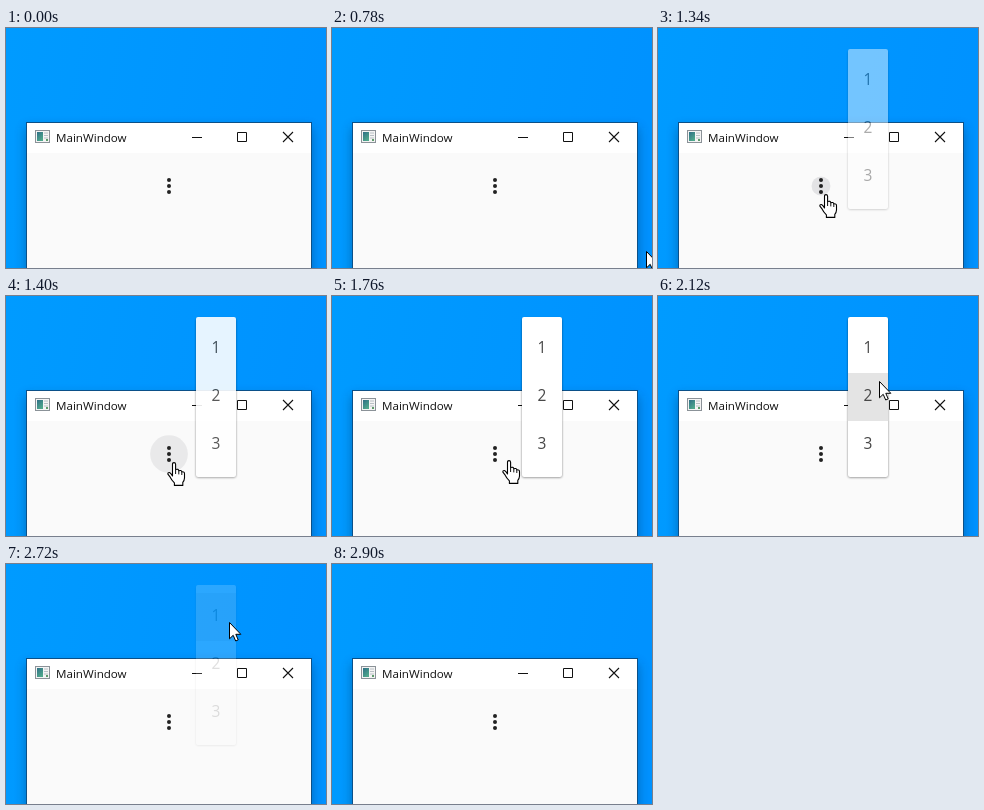
An HTML page that plays this animation: 320x240 px, repeating every 3100 ms.

```html
<!DOCTYPE html>
<html lang="en">
<head>
<meta charset="utf-8">
<title>Popup menu</title>
<style>
  html, body { margin: 0; width: 100%; height: 100%; overflow: hidden; background: #0097fd; }
  svg { display: block; width: 100vw; height: 100vh; }
  text { font-family: "Open Sans", "Noto Sans", sans-serif; }
  .title { font-size: 11.6px; fill: #111; }
  .item { font-size: 15.5px; fill: #484848; text-anchor: middle; }
  .glyph { fill: none; stroke: #111; }
  .cursor { fill: #fff; stroke: #000; stroke-linejoin: round; }
</style>
</head>
<body>
<svg viewBox="0 0 320 240">
  <defs>
    <linearGradient id="sky" x2="1" y2="0.15">
      <stop offset="0" stop-color="#009bff"/>
      <stop offset="1" stop-color="#0092ff"/>
    </linearGradient>
    <linearGradient id="teal" x2="0.6" y2="1">
      <stop offset="0" stop-color="#2f6f86"/>
      <stop offset="1" stop-color="#4fa88c"/>
    </linearGradient>
    <filter id="blur" x="-20%" y="-20%" width="140%" height="140%"><feGaussianBlur stdDeviation="6"/></filter>
    <filter id="soft" x="-20%" y="-10%" width="140%" height="120%"><feGaussianBlur stdDeviation="1.2"/></filter>
  </defs>

  <rect width="320" height="240" fill="url(#sky)"/>

  <rect x="20" y="100" width="286" height="170" fill="#002a55" opacity=".4" filter="url(#blur)"/>
  <rect x="20" y="94" width="286" height="160" fill="#0b5088"/>
  <rect x="21" y="95" width="284" height="150" fill="#fff"/>
  <rect x="21" y="125" width="284" height="120" fill="#fafafa"/>

  <g>
    <rect x="29.5" y="102.5" width="14" height="12" fill="#f4f4f4" stroke="#8b9298"/>
    <rect x="31" y="104" width="6" height="9" fill="url(#teal)"/>
    <path d="M38 105h4M38 107.5h4M38 110h4" stroke="#b9c0c5"/>
    <rect x="40" y="111" width="2" height="2" fill="#5d9b6a"/>
  </g>
  <text class="title" x="50" y="114">MainWindow</text>
  <path class="glyph" d="M186 109.5h10M231.5 104.5h9v9h-9z"/>
  <path class="glyph" d="M277 104l10 10M287 104l-10 10" stroke-width="1.1"/>

  <circle id="ripple" cx="163" cy="158" r="0" fill="#1c1c30"/>
  <g fill="#222">
    <circle cx="163" cy="152" r="2"/>
    <circle cx="163" cy="158" r="2"/>
    <circle cx="163" cy="164" r="2"/>
  </g>

  <g id="popup">
    <rect x="190" y="22.5" width="40" height="159" rx="2" opacity=".5" filter="url(#soft)"/>
    <rect x="190" y="21" width="40" height="160" rx="2" fill="#fff"/>
    <rect id="hover" x="190" width="40" height="48" fill="#e4e4e4"/>
    <text class="item" x="210" y="57">1</text>
    <text class="item" x="210" y="105">2</text>
    <text class="item" x="210" y="153">3</text>
  </g>

  <g id="pointer">
    <path id="arrow" class="cursor" d="M.5 .5V16.8L4.2 13.3L6.7 19L9.2 17.9L6.8 12.3H11.8Z"/>
    <g id="hand" transform="translate(-6 0)">
      <path class="cursor" stroke-width="1.1" d="M5.5 14V2.2Q5.5 .6 7 .6T8.6 2.2V7.6Q11.5 6.6 11.8 8.7Q14.4 7.8 14.8 9.9Q17.6 9.4 17.5 11.8V16Q17.4 18.5 15.8 20.3V23.4H7.4V20.8Q4.6 18.2 3.2 15.2L.9 12.2Q.6 10.4 2.4 10.5Q3.6 10.8 5.5 14Z"/>
      <path class="glyph" d="M8.6 7.5V12M11.8 8.8V12.4M14.8 10V13"/>
    </g>
  </g>
</svg>
<script>
const LOOP = 3100, STEP = 20;
const $ = id => document.getElementById(id);
const clamp = v => Math.min(1, Math.max(0, v));
const smooth = p => p * p * (3 - 2 * p);
const linear = p => p;

// time, x, y of the pointer tip, easing used to get there
const track = [
  [780, 314, 223, linear],
  [1060, 167, 166, p => 1 - (1 - p) ** 1.8],
  [1740, 167, 166, linear],
  [1760, 176, 164, linear],
  [1940, 230, 112, linear],
  [2120, 221, 85, smooth],
  [2180, 221, 88, smooth],
  [2300, 221, 88, linear],
  [2480, 223, 58, smooth],
  [2860, 223, 58, linear],
  [2880, 242, 57, linear],
  [2900, 242, 57, linear]
];

function pointerAt(t) {
  const i = track.findIndex(k => k[0] > t);
  if (i < 1) return null;
  const [t0, x0, y0] = track[i - 1], [t1, x1, y1, ease] = track[i];
  const p = ease((t - t0) / (t1 - t0));
  return { x: Math.round(x0 + (x1 - x0) * p), y: Math.round(y0 + (y1 - y0) * p) };
}

const show = (el, on) => el.style.display = on ? "" : "none";

function draw(t) {
  const tip = pointerAt(t);
  show($("pointer"), tip);
  if (tip) {
    const onButton = tip.x < 188;
    $("pointer").setAttribute("transform", `translate(${tip.x} ${tip.y})`);
    show($("hand"), onButton);
    show($("arrow"), !onButton);
  }

  const open = clamp((t - 1280) / 133) * clamp((2740 - t) / 120);
  $("popup").style.opacity = open;
  show($("popup"), open > 0);

  const hovering = tip && t >= 1760 && tip.x >= 190;
  show($("hover"), hovering);
  if (hovering) $("hover").setAttribute("y", 29 + 48 * Math.floor((tip.y - 29) / 48));

  const wave = clamp((t - 1280) / 210);
  $("ripple").setAttribute("r", 33 * wave);
  $("ripple").style.opacity = 0.11 * clamp((1560 - t) / 240);
}

const start = performance.now();
function tick() {
  const t = (performance.now() - start) % LOOP;
  draw(Math.floor(t / STEP) * STEP);
  requestAnimationFrame(tick);
}
draw(0);
requestAnimationFrame(tick);
</script>
</body>
</html>
```
